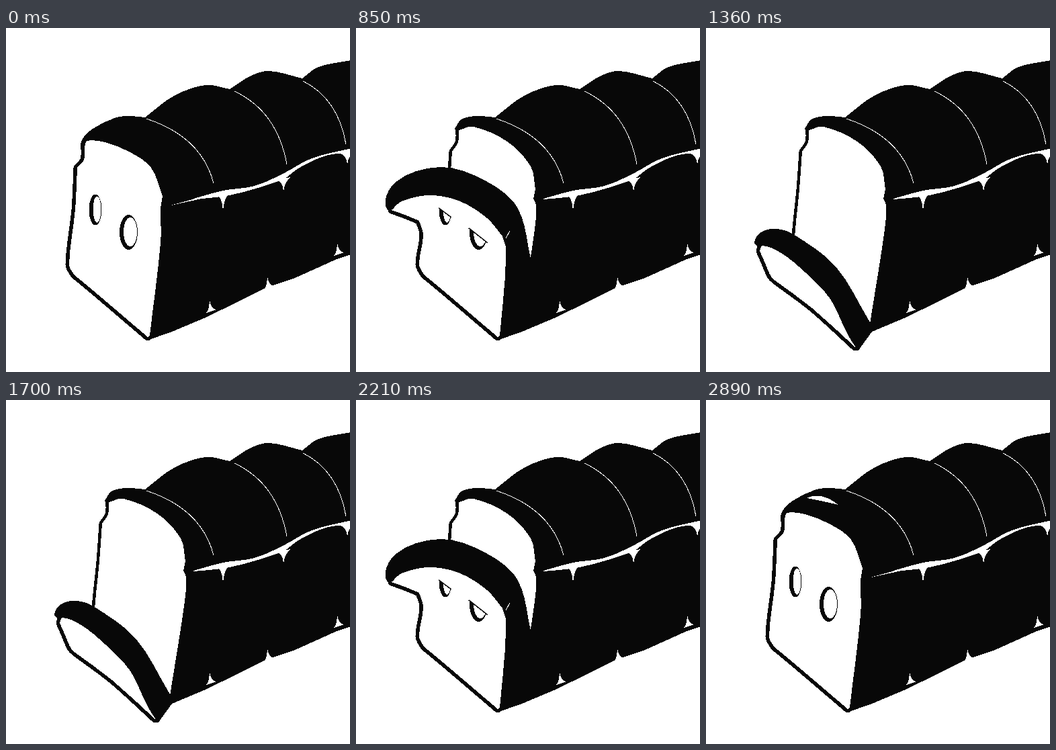
Animation of 512 by 512 pixels, one loop 3.06 s. Source, as an HTML page:

```html
<!DOCTYPE html>
<html lang="en">
<head>
<meta charset="utf-8">
<title>Bread</title>
<style>
html, body { margin: 0; width: 100%; height: 100%; overflow: hidden; background: #fff; }
svg { display: block; width: 100%; height: 100%; }
.ink { fill: #080808; }
.paper { fill: #fff; }
.face { fill: #fff; stroke: #080808; stroke-linejoin: round; paint-order: stroke; }
.thread { fill: none; stroke: #fff; }
.lid { fill: none; stroke: #080808; stroke-width: 3; }
</style>
</head>
<body>
<svg id="stage" viewBox="0 0 512 512" shape-rendering="crispEdges"></svg>
<script>
const STEP = 170, LAST = 9, DEEPEST = 8.35;

// Smooth closed curve through "x,y" points; "/" marks a sharp corner.
function curve(text) {
  let d = '', last = null;
  for (const run of text.split('/')) {
    const pts = run.trim().split(/\s+/).map(p => p.split(',').map(Number));
    if (last) pts.unshift(last);
    else d = 'M' + pts[0];
    const handle = (i, reach) => {
      const a = pts[Math.max(i - 1, 0)], b = pts[Math.min(i + 1, pts.length - 1)];
      const k = reach / (Math.hypot(b[0] - a[0], b[1] - a[1]) || 1);
      return [pts[i][0] + (b[0] - a[0]) * k, pts[i][1] + (b[1] - a[1]) * k];
    };
    for (let i = 1; i < pts.length; i++) {
      const reach = Math.hypot(pts[i][0] - pts[i - 1][0], pts[i][1] - pts[i - 1][1]) / 3;
      d += `C${handle(i - 1, reach)} ${handle(i, -reach)} ${pts[i]}`;
    }
    last = pts[pts.length - 1];
  }
  return d + 'Z';
}

// Blend every number of two equally built point strings.
function mix(a, b, t) {
  const ends = b.match(/[\d.]+/g);
  let i = 0;
  return a.replace(/[\d.]+/g, n => +n + (ends[i++] - n) * t);
}

const path = (kind, d, width = 1) => `<path class="${kind}" d="${d}" stroke-width="${width}"/>`;
const oval = (kind, x, y, rx, ry) => `<ellipse class="${kind}" cx="${x}" cy="${y}" rx="${rx}" ry="${ry}"/>`;

const loaf = path('ink', curve(`147,150 157,136 180,131 207,133 / 250,101 297,85 333,91 / 365,71 392,64 441,75
    / 465,58 514,48 / 514,337 / 490,345 430,372 388,386 / 350,405 297,431 / 247,452 / 200,300`))
  + path('face', curve(`153,152 175,147 225,169 260,206 267,240 / 264,254 / 268,264 266,300 244,440 / 131,345
    / 132,310 139,240 143,184 / 152,170 153,152`), 9);

const crease = (x, y, w, h) =>
  path('thread', `M${x},${y}q${w * .82},${h * .28} ${w},${h}`);
const drop = (x, y, h) =>
  path('paper', `M${x - 10},${y}q10,3 10,${h}q0,${4 - h} 11,${-h - 4}z`);
const tuck = (x, y) =>
  path('paper', `M${x},${y}q1,14 10,16l-15,5q5,-6 5,-21z`);

const seams = path('paper', curve(`279,254 323,242 370,235 412,217 455,194 514,179 / 514,187
    / 480,189 440,206 414,225 / 375,238 328,250 279,255`))
  + crease(209, 135, 100, 96) + crease(340, 94, 78, 109) + crease(442, 79, 64, 94)
  + drop(323, 249, 28) + drop(413, 226, 21) + drop(508, 187, 20)
  + tuck(303, 403) + tuck(389, 368) + tuck(493, 318);

const closedSeam = path('paper', 'M241,265L300,249V252z');
const slit = path('paper', 'M150,146q22,-10 47,10q-25,-6 -47,-10z');

// Front slice at chosen stages of the fold; the rest is blended from these.
const base = '/ 230,320 214,457 / 211,460 / 130,391 101,367 / 94,352';
const folds = [
  { at: 0, heel: '210,465',
    crown: '130,185 / 112,180 116,162 134,147 160,135 185,132 207,133 / 260,170',
    face: `117,176 121,168 147,170 185,185 216,208 233,250 / 230,268 ${base} 103,270 106,208 / 116,196 117,176` },
  { at: 2, heel: '210,465',
    crown: '110,190 / 86,196 95,166 128,146 165,152 205,172 236,193 / 238,176',
    face: `91,198 97,186 130,178 173,187 209,213 233,250 / 230,268 ${base} 103,280 104,222 / 97,213 91,198` },
  { at: 5, heel: '210,465',
    crown: '90,262 / 48,272 58,230 125,207 190,226 240,267 261,348 / 262,350',
    face: `53,271 68,258 110,249 155,258 195,283 218,310 / 223,325 ${base.replace('230,320', '222,370')} 100,308 94,287 / 75,279 53,271` },
  { at: 7, heel: '212,474',
    crown: '90,300 / 56,302 55,275 98,260 150,267 212,310 252,404 / 253,406',
    face: `72,298 90,297 115,304 145,320 185,346 205,378 / 214,408 / 215,430 215,456 / 211,461
      / 155,413 103,371 / 94,357 98,325 93,308 / 84,301 72,298` },
  { at: 8, heel: '226,481',
    crown: '95,330 / 73,322 82,304 105,299 130,307 193,355 244,438 / 245,440',
    face: `80,332 84,324 112,335 148,364 184,402 206,446 / 212,458 / 218,468 222,474 / 222,475
      / 158,417 103,376 / 97,370 92,360 88,350 / 84,341 80,332` }
];

function slice(fold) {
  const next = Math.max(1, folds.findIndex(f => f.at >= fold));
  const i = fold > folds.at(-1).at ? folds.length - 1 : next;
  const a = folds[i - 1], b = folds[i], t = (fold - a.at) / (b.at - a.at);
  const part = name => mix(a[name], b[name], t);
  return path('ink', curve(`${part('crown')} / 290,350 / 297,431 / 247,452 / ${part('heel')}`))
    + path('face', curve(part('face')), 11);
}

function eyes(pose) {
  const drop = pose < 4 ? -60 : (pose - 5) * 12;
  return `<clipPath id="open"><path d="M123,${267 + drop}l19,14h26V${297 + drop}l28,22V340H123z"/></clipPath>
    <g clip-path="url(#open)">`
    + oval('ink', 133, 270.5, 9.5, 23) + oval('paper', 135.5, 270, 6, 19.5)
    + oval('ink', 182.5, 304, 13.5, 26) + oval('paper', 185, 303.5, 10, 21.5)
    + (pose < 4 ? '' : path('lid', `M123,${267 + drop}l19,14M168,${297 + drop}l28,22`, 3))
    + '</g>';
}

function picture(pose) {
  const fold = pose < 2 ? 0 : Math.min(pose, DEEPEST);
  return loaf + slice(fold)
    + (pose < 7 ? eyes(pose) : '')
    + (pose === 1 ? slit : '')
    + (pose > 4 && pose < 8 ? path('thread', `M${229 - (pose - 5) * 13},${302 + (pose - 5) * 12}l${-6 - (pose - 5) * 4},${11 + (pose - 5) * 2}`) : '')
    + seams + (pose < 3 ? closedSeam : '');
}

const pictures = Array.from({ length: LAST + 1 }, (_, pose) => picture(pose));
const stage = document.getElementById('stage');
const start = performance.now();
let shown = -1;

// The fold goes down and comes back up in held steps.
function draw() {
  const step = Math.floor((performance.now() - start) / STEP) % (2 * LAST);
  const pose = Math.min(step, 2 * LAST - step);
  if (pose !== shown) stage.innerHTML = pictures[shown = pose];
  requestAnimationFrame(draw);
}
draw();
</script>
</body>
</html>
```
